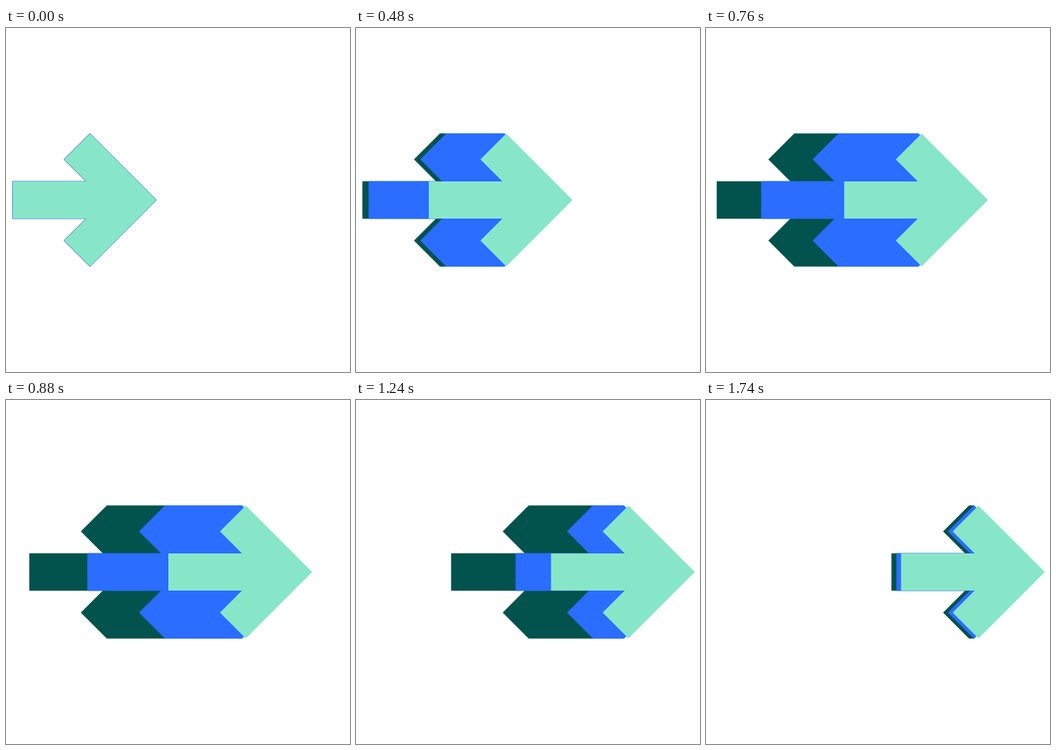
An HTML page for the animation above (1760 ms loop, 500 px wide and 500 px high).

```html
<!DOCTYPE html>
<html lang="en">
<head>
<meta charset="utf-8">
<title>Arrow trail</title>
<style>
  html, body { margin: 0; width: 100%; height: 100%; overflow: hidden; background: #fff; }
  svg { display: block; width: 100%; height: 100%; }
  #dark { fill: #02524d; stroke: #02524d; stroke-width: .5; }
  #blue { fill: #2a6dff; stroke: #2a6dff; stroke-width: .8; }
  #mint { fill: #87e6c8; }
</style>
</head>
<body>
<svg viewBox="0 0 500 500">
  <path id="dark"/>
  <path id="blue"/>
  <path id="mint"/>
</svg>
<script>
  const LOOP = 1760;
  const MINT_TRAVEL = 274;
  const TRAIL_TRAVEL = 267.5;
  const [dark, blue, mint] = ["dark", "blue", "mint"].map(id => document.getElementById(id));

  // Sine ease in and out, from 0 to 1
  function ease(t, start, length) {
    const p = Math.min(1, Math.max(0, (t - start) / length));
    return (1 - Math.cos(Math.PI * p)) / 2;
  }

  // Arrow swept from offset tail to offset head
  function arrow(tail, head) {
    const upper = [
      [9.5 + tail, 223], [116.5 + tail, 223], [84.5 + tail, 191],
      [122 + tail, 153.5], [122 + head, 153.5], [218.5 + head, 250]
    ];
    const lower = upper.slice(0, -1).reverse().map(([x, y]) => [x, 500 - y]);
    return "M" + upper.concat(lower).join("L") + "Z";
  }

  function draw() {
    const t = performance.now() % LOOP;
    const lead = ease(t, -20, 1240);
    const blueTail = TRAIL_TRAVEL * ease(t, 334, 1240);
    const darkTail = TRAIL_TRAVEL * ease(t, 640, 1230);
    const front = MINT_TRAVEL * lead;
    mint.setAttribute("d", arrow(front, front));
    blue.setAttribute("d", arrow(blueTail, TRAIL_TRAVEL * lead));
    dark.setAttribute("d", arrow(darkTail, blueTail));
    requestAnimationFrame(draw);
  }
  draw();
</script>
</body>
</html>
```
